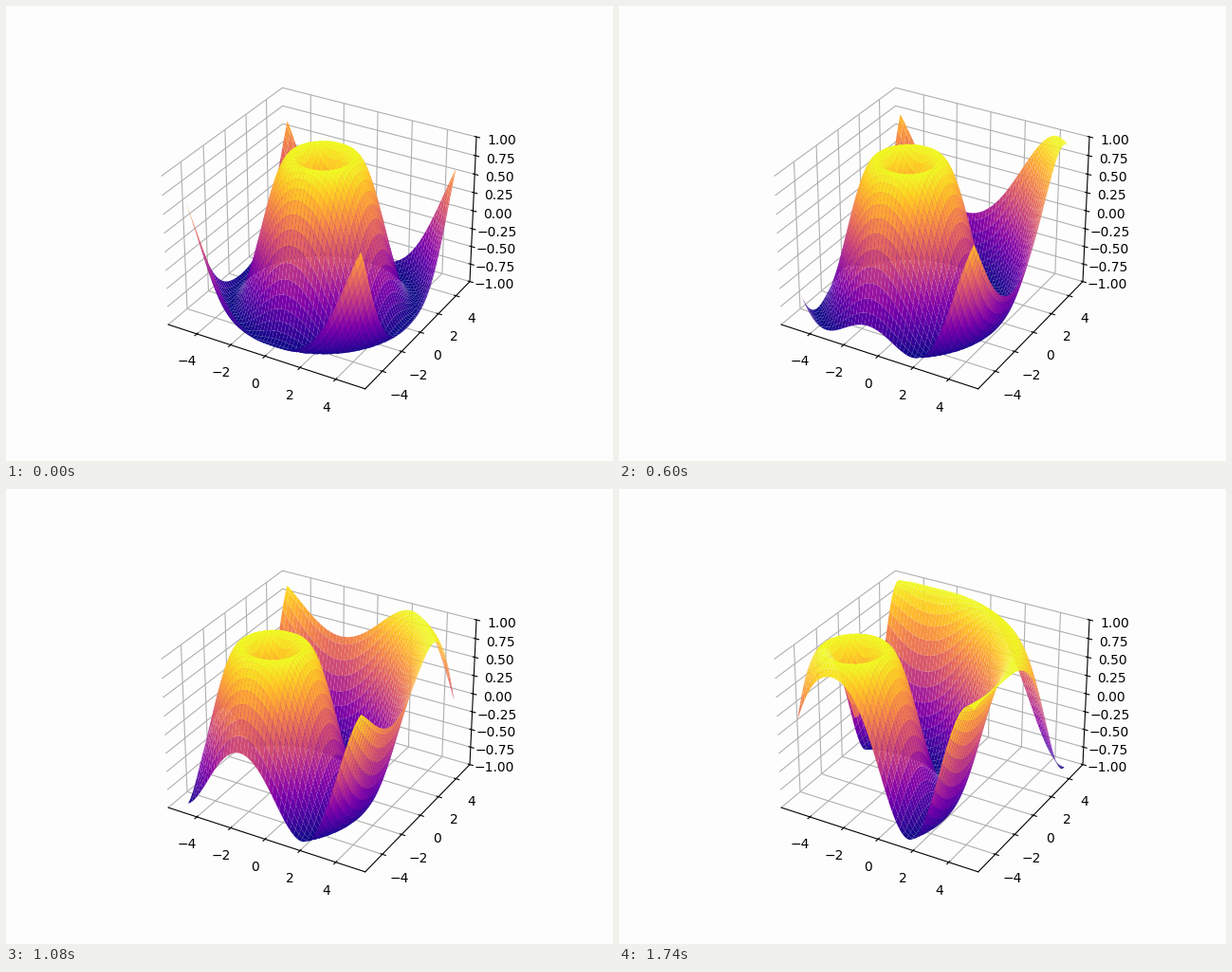
These frames come from a looping animation (640x480 px, 1800 ms). A matplotlib script:

```python
import numpy as np
import matplotlib.pyplot as plt
from matplotlib.animation import FuncAnimation

FRAMES = 30
INTERVAL = 60  # ms
STEP = 0.1  # shift of the ripple centre per frame
PAPER = "#fdfdfd"

fig = plt.figure(figsize=(6.4, 4.8), dpi=100, facecolor=PAPER)
ax = fig.add_subplot(projection="3d")
ax.set_facecolor(PAPER)
ax.set_zlim(-1, 1)
for axis in (ax.xaxis, ax.yaxis, ax.zaxis):
    axis.set_pane_color((1, 1, 1, 0))

grid = np.arange(-5, 5, 0.1)
X, Y = np.meshgrid(grid, grid)


def draw_surface(frame):
    shift = STEP * frame
    Z = np.sin(np.hypot(X + shift, Y + shift))
    return ax.plot_surface(X, Y, Z, cmap="plasma")


def update(frame):
    for old in list(ax.collections):
        old.remove()
    return (draw_surface(frame),)


def init():
    return update(0)


anim = FuncAnimation(fig, update, frames=FRAMES, init_func=init,
                     interval=INTERVAL, repeat=True, repeat_delay=0,
                     blit=False)

plt.show()
```
